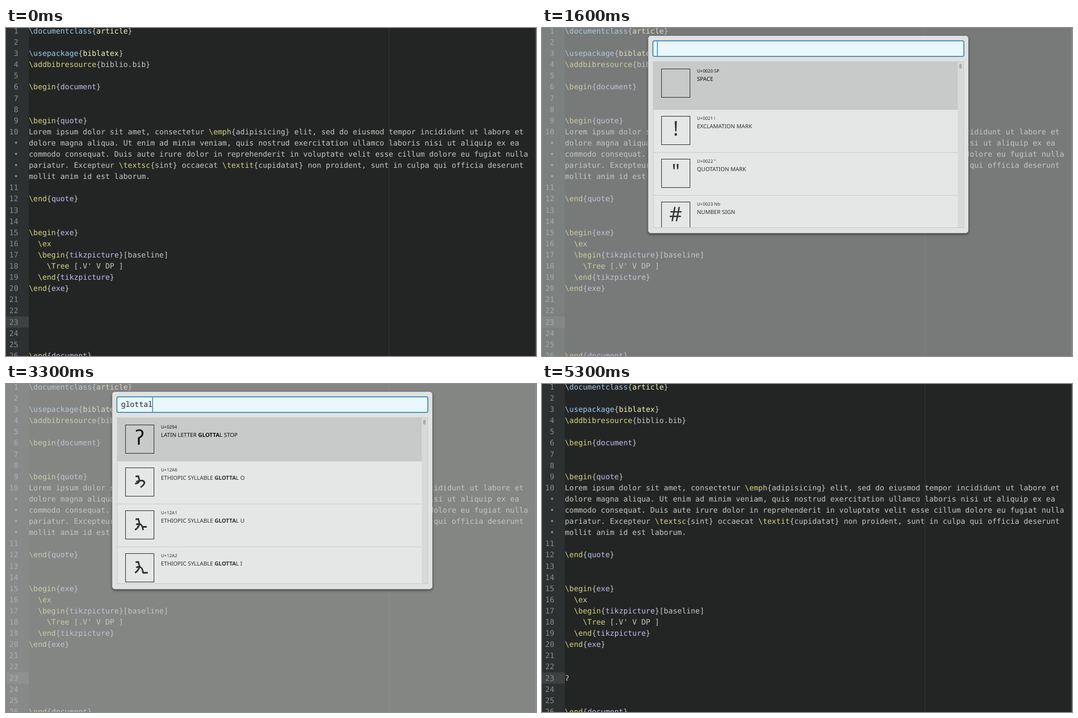
These frames come from a looping animation (951x589 px, 5700 ms). An HTML page:

```html
<!DOCTYPE html>
<html lang="en">
<head>
<meta charset="utf-8">
<title>Character picker</title>
<style>
  html, body { margin: 0; width: 100%; height: 100%; overflow: hidden; background: #232524; }
  svg { display: block; }
  text { white-space: pre; text-rendering: geometricPrecision; }
  .code text { font: 13.42px "DejaVu Sans Mono", monospace; fill: #c6c7c2; }
  .code .num { fill: #8a8d8b; text-anchor: end; }
  .cmd { fill: #d6d283; }
  .pre { fill: #9dcbf0; }
  .arg { fill: #f3f2bd; }
  .env { fill: #c1bfec; }
  .query { font: 13.4px "Noto Sans Mono", "DejaVu Sans Mono", monospace; fill: #1d2021; }
  .item { fill: #2e3132; color: #2e3132; font-family: "Noto Sans", "Open Sans", sans-serif; }
  .item.on { fill: #0d0f0f; color: #0d0f0f; }
  .item .id { font-size: 8px; }
  .item .name { font-size: 10.02px; }
  .item .glyph { text-anchor: middle; }
  .item path { fill: none; stroke: currentColor; stroke-linejoin: round; }
  .bold { font-weight: 700; }
</style>
</head>
<body>
<svg width="951" height="589" viewBox="0 0 951 589">
  <defs><clipPath id="view"><rect x="200" y="61" width="556" height="297"/></clipPath></defs>
  <rect width="951" height="589" fill="#232524"/>
  <rect width="41" height="589" fill="#2d3030"/>
  <rect y="518" width="41" height="20" fill="#3e4141"/>
  <rect x="687" width="1" height="589" fill="#343635"/>
  <g class="code" id="code"></g>
  <text id="typed"></text>
  <rect id="caret" y="518" width="1" height="20" fill="#f4f4f0"/>
  <rect x="949" width="2" height="589" fill="#373a39"/>
  <rect id="veil" width="951" height="589" fill="#c3c6c4"/>
  <g id="dialog">
    <rect x="190.5" y="14" width="574.5" height="354.5" rx="5" fill="#dfe2e0"
      style="filter: drop-shadow(0 2px 2px rgba(0,0,0,.55))"/>
    <rect x="199" y="23" width="558" height="28" rx="3" fill="#e9f8fe" stroke="#5294c8" stroke-width="2"/>
    <text class="query" id="query" x="206.5" y="41.4"></text>
    <rect id="bar" y="24" width="1.6" height="26" fill="#4b8dc2"/>
    <rect x="199.5" y="60.5" width="557" height="298" fill="#e4e7e5" stroke="#c6c9c7"/>
    <g id="list" clip-path="url(#view)"></g>
    <rect x="746" y="61" width="10" height="297" fill="#d7dad8"/>
    <rect x="748.5" y="64" width="4.5" height="9" rx="2.2" fill="#a9acaa"/>
  </g>
</svg>
<script>
const LOOP = 5700;
const $ = id => document.getElementById(id);

// Editor text; a leading "~" marks a soft-wrapped row.
const SOURCE = String.raw`\documentclass{article}

\usepackage{biblatex}
\addbibresource{biblio.bib}

\begin{document}


\begin{quote}
Lorem ipsum dolor sit amet, consectetur \emph{adipisicing} elit, sed do eiusmod tempor incididunt ut labore et
~dolore magna aliqua. Ut enim ad minim veniam, quis nostrud exercitation ullamco laboris nisi ut aliquip ex ea
~commodo consequat. Duis aute irure dolor in reprehenderit in voluptate velit esse cillum dolore eu fugiat nulla
~pariatur. Excepteur \textsc{sint} occaecat \textit{cupidatat} non proident, sunt in culpa qui officia deserunt
~mollit anim id est laborum.

\end{quote}


\begin{exe}
  \ex
  \begin{tikzpicture}[baseline]
    \Tree [.V' V DP ]
  \end{tikzpicture}
\end{exe}





\end{document}`.split("\n");

const rowY = i => 9.9 + 20.1 * i;
const span = (cls, s) => `<tspan class="${cls}">${s}</tspan>`;

function highlight(line) {
  return line.replace(/\\(\w+)(?:\{(\w+))?/g, (m, cmd, arg) => {
    const load = /^(documentclass|usepackage)$/.test(cmd);
    const env = /^(begin|end)$/.test(cmd);
    const head = span(load ? "pre" : "cmd", "\\" + cmd);
    if (!arg) return head;
    return head + "{" + (load ? span("arg", arg) : env ? span("env", arg) : arg);
  });
}

let number = 0;
SOURCE.push();
$("code").innerHTML = SOURCE.map((line, i) => {
  const wrapped = line[0] === "~";
  const label = wrapped ? "•" : ++number;
  return `<text class="num" x="22" y="${rowY(i)}">${label}</text>` +
    `<text x="41" y="${rowY(i)}">${highlight(wrapped ? line.slice(1) : line)}</text>`;
}).join("");
$("code").appendChild($("typed"));
$("typed").setAttribute("x", 41);
$("typed").setAttribute("y", rowY(26));

// Glyph drawings, relative to the top left of their box.
const letter = (s, size = 35, y = 35, font = "Noto Sans") =>
  `<text class="glyph" x="25.5" y="${y}" style="font:${size}px '${font}','DejaVu Sans',sans-serif">${s}</text>`;
const stroke = (d, w = 2.8) => `<path d="${d}" stroke-width="${w}"/>`;
const ALEF = "M18 15.5L23 15Q24 19 25 23";
const LEGS = ALEF + "Q24 30 17 34.5M19 25Q30 20 31.5 35";

const GLYPHS = {
  space: "",
  bang: letter("!", 36, 34.5),
  quote: letter("&quot;", 36, 34.5),
  hash: letter("#", 36, 34.5),
  g: letter("g", 34, 31, "Open Sans") + stroke("M24 34.5H37", 2),
  gamma: letter("γ", 33, 33),
  G: letter("G", 34, 35, "Open Sans") + stroke("M25 26.5H38", 2),
  gaf: stroke("M13 29Q9 36 21 36Q35 35 36 28Q35 23 27 19L40 11M28 9L40 4.5"),
  stop: letter("ʔ", 36, 35.5),
  a: stroke(LEGS),
  u: stroke(LEGS + "M31 29H38"),
  i: stroke(LEGS + "M31 34.5H40", 2.8),
  o: stroke(ALEF + "Q24 28 17 28.5M19 25Q33 20 34 27Q33 31 27 35")
};

// Items are [code, name, glyph]; asterisks wrap bold parts.
const START = [
  ["U+0020 SP", "SPACE", "space"],
  ["U+0021 !", "EXCLAMATION MARK", "bang"],
  ["U+0022 &quot;", "QUOTATION MARK", "quote"],
  ["U+0023 Nb", "NUMBER SIGN", "hash"]
];
const LETTER_G = [
  ["U+01E5 *g/*", "LATIN SMALL LETTER *G* WITH STROKE", "g"],
  ["U+03B3 *g*&quot;", "*G*REEK SMALL LETTER GAMMA", "gamma"],
  ["U+01E4 *G/*", "LATIN CAPITAL LETTER *G* WITH STROKE", "G"],
  ["U+06AF *g*f", "ARABIC LETTER *G*AF", "gaf"]
];
const CODES = { a: "12A0", u: "12A1", i: "12A2", o: "12A6" };

function glottal(n, order) {
  const word = `*${"GLOTTAL".slice(0, n)}*${"GLOTTAL".slice(n)}`;
  return [["U+0294", `LATIN LETTER ${word} STOP`, "stop"]].concat(
    [...order].map(v => ["U+" + CODES[v], `ETHIOPIC SYLLABLE ${word} ${v.toUpperCase()}`, v]));
}

const bold = s => s.split("*").map((part, i) => i % 2 ? span("bold", part) : part).join("");

function listMarkup(items) {
  const extra = items === START ? 8 : 0;
  const boxTop = i => 73.5 + 77 * i + (i ? extra : 0);
  const edge = i => boxTop(i) - 12.5;
  const selected = `<rect x="200" y="61" width="546" height="${edge(1) - 61}" fill="#c7cac8"/>`;
  return selected + items.map(([id, name, glyph], i) =>
    (i ? `<rect x="200" y="${edge(i)}" width="546" height="1" fill="#c9ccca"/>` : "") +
    `<g class="item${i ? "" : " on"}" transform="translate(214.5 ${boxTop(i)})">
      <rect width="51" height="51" fill="none" stroke="#2b2e2e"/>${GLYPHS[glyph]}
      <text class="id" x="63.5" y="6.9">${bold(id)}</text>
      <text class="name" x="63.5" y="21.4">${bold(name)}</text>
    </g>`).join("");
}

// Results lag one step behind the typed query.
const STEPS = [
  [1500, "", START],
  [2100, "g", START],
  [2300, "gl", LETTER_G],
  [2800, "glo", glottal(2, "aui")],
  [3000, "glott", glottal(4, "aui")],
  [3100, "glotta", glottal(5, "aui")],
  [3300, "glottal", glottal(6, "oui")],
  [3600, "glottal", glottal(7, "iua")]
];

const within = (t, ...spans) => spans.some(([a, b]) => t >= a && t < b);
const show = (id, on) => $(id).setAttribute("visibility", on ? "visible" : "hidden");
let shown = null;

function draw(t) {
  const open = within(t, [1500, 4800]);
  const done = t >= 4800;
  show("dialog", open);
  show("veil", open);
  show("caret", within(t, [100, 600], [900, 1500], [4800, 5300]));
  $("caret").setAttribute("x", done ? 49 : 41);
  $("typed").textContent = done ? "ʔ" : "";
  show("bar", within(t, [1500, 3600], [3900, 4300]));
  $("veil").setAttribute("opacity", t < 1600 ? 0.33 : t < 1700 ? 0.53 : 0.605);
  if (!open) return;

  const [, query, items] = STEPS.filter(s => s[0] <= t).pop();
  $("query").textContent = query;
  $("bar").setAttribute("x", 206.2 + 8.04 * query.length - (query ? 0.3 : 0));
  if (items !== shown) {
    $("list").innerHTML = listMarkup(items);
    shown = items;
  }
}

const begin = performance.now();
function tick(now) {
  draw(Math.max(0, now - begin) % LOOP);
  requestAnimationFrame(tick);
}
draw(0);
requestAnimationFrame(tick);
</script>
</body>
</html>
```
